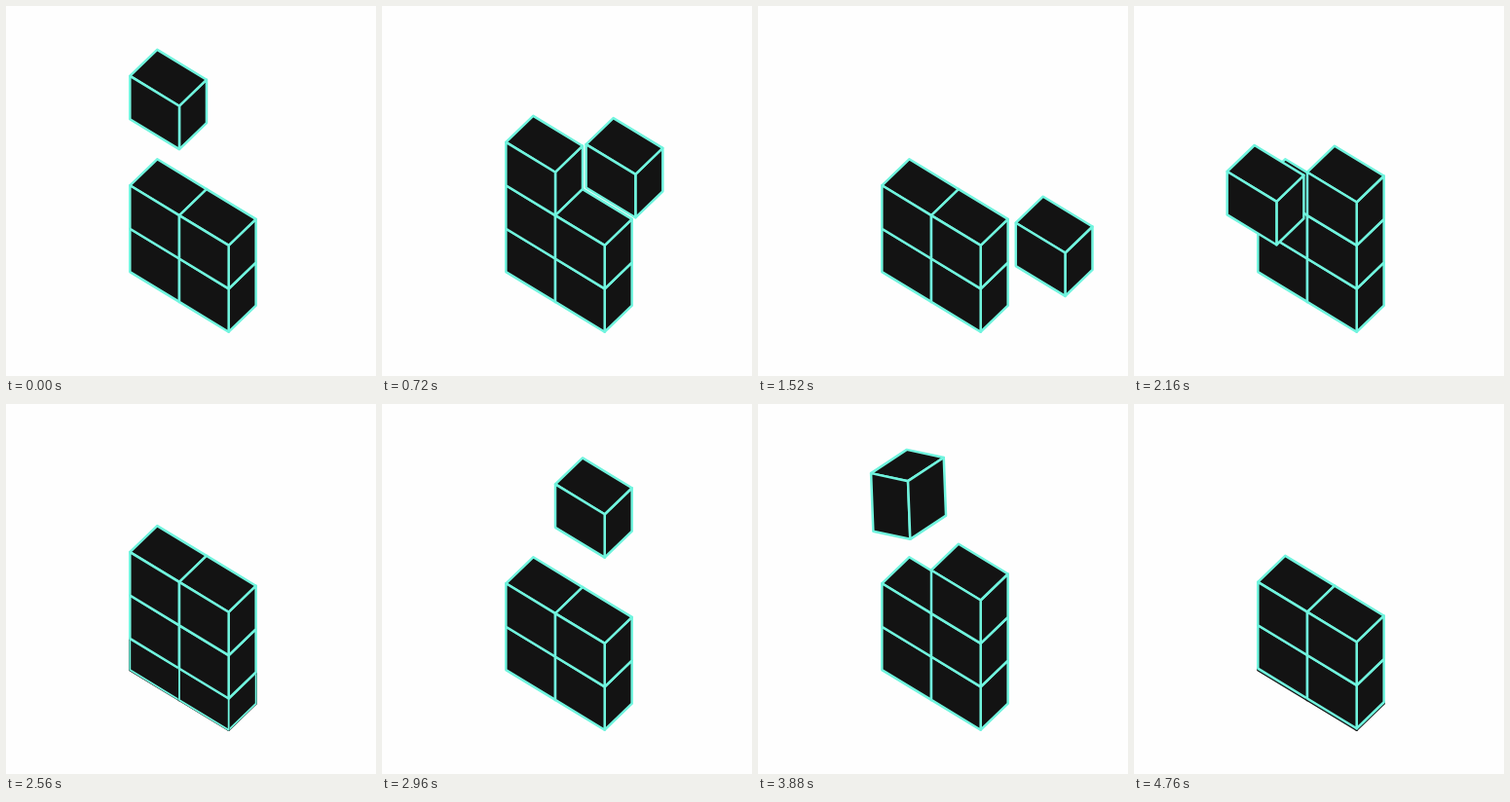
An HTML page with a canvas for the animation above (4.8 s loop, 380 by 380 pixels).

```html
<!DOCTYPE html>
<html lang="en">
<head>
<meta charset="utf-8">
<title>Stacking blocks</title>
<style>
  html, body { margin: 0; width: 100%; height: 100%; overflow: hidden; background: #fefefe; }
  canvas { display: block; width: 380px; height: 380px; }
</style>
</head>
<body>
<canvas id="stage"></canvas>
<script>
const LOOP = 4800, BEAT = 480;
const INK = '#131313', LINE = '#70f4de', WEIGHT = 2.5;
const ORIGIN = [127.3, 273.1];

// Orthographic view: screen x, screen y and depth of a point in the block's world.
const VIEW = [[0.78, 0, 0.622], [0.474, 0.643, -0.6], [-0.4, 0.766, 0.504]];
const SIZE = [65, 69.05, 45];

const canvas = document.getElementById('stage');
const ctx = canvas.getContext('2d');
const ratio = window.devicePixelRatio || 1;
canvas.width = canvas.height = 380 * ratio;
ctx.scale(ratio, ratio);
ctx.lineJoin = 'round';

// Each block slides from a screen offset into its column.
const blocks = [
  { col: 0, start: 0, end: 1440, from: [0, -68] },
  { col: 1, start: 480, end: 1440, from: [64, -58] },
  { col: 1, start: 1440, end: 2880, from: [88.5, 53] },
  { col: 0, start: 1920, end: 2880, from: [-64, 61] },
  { col: 1, start: 2880, end: 4800, from: [0, -90] },
  { col: 0, start: 3360, end: 4800, from: [-88.5, -53.8], tumble: true }
];
const sinks = [960, 2400, 4320];

const clamp = v => Math.min(1, Math.max(0, v));
const inOut = (t, power) => t < 0.5
  ? 0.5 * (2 * t) ** power
  : 1 - 0.5 * (2 - 2 * t) ** power;
const project = v => VIEW.map(row => row[0] * v[0] + row[1] * v[1] + row[2] * v[2]);

function spin(v, [ax, ay, az]) {
  const turn = (a, b, angle) => {
    const c = Math.cos(angle), s = Math.sin(angle);
    return [a * c - b * s, a * s + b * c];
  };
  let [x, y, z] = v;
  [x, y] = turn(x, y, az);
  [z, x] = turn(z, x, ay);
  [y, z] = turn(y, z, ax);
  return [x, y, z];
}

function drawBox(col, floor, { stretch = 1, shift = [0, 0], angles = [0, 0, 0] } = {}) {
  const size = [SIZE[0], SIZE[1] * stretch, SIZE[2]];
  const mid = project([SIZE[0] * (col + 0.5), -floor - size[1] / 2, SIZE[2] / 2]);
  const cx = ORIGIN[0] + mid[0] + shift[0];
  const cy = ORIGIN[1] + mid[1] + shift[1];
  const half = size.map((s, i) =>
    project(spin([0, 1, 2].map(k => k === i ? s / 2 : 0), angles)));

  for (let i = 0; i < 3; i++) {
    const near = half[i][2] < 0 ? 1 : -1;
    const n = half[i], p = half[(i + 1) % 3], q = half[(i + 2) % 3];
    ctx.beginPath();
    for (const [a, b] of [[-1, -1], [1, -1], [1, 1], [-1, 1]]) {
      ctx.lineTo(cx + near * n[0] + a * p[0] + b * q[0],
                 cy + near * n[1] + a * p[1] + b * q[1]);
    }
    ctx.closePath();
    ctx.fillStyle = INK;
    ctx.fill();
    if (stretch < 1) {
      ctx.strokeStyle = INK;
      ctx.lineWidth = WEIGHT;
      ctx.stroke();
    }
    ctx.strokeStyle = LINE;
    ctx.lineWidth = WEIGHT * stretch;
    ctx.stroke();
  }
}

function pose(block, time) {
  if (!block.tumble) {
    const left = 1 - inOut(clamp((time - block.start) / BEAT), 3);
    return { shift: block.from.map(v => v * left) };
  }
  const t = clamp((time - 3520) / 560);
  const left = 1 - inOut(t, 3.8);
  const arc = Math.sin(Math.PI * t);
  return {
    shift: [block.from[0] * left, block.from[1] * left - 71 * arc],
    angles: [Math.PI * (1 - t) ** 1.09, Math.PI * (1 - t) ** 0.89, 0.21 * arc]
  };
}

function draw(time) {
  ctx.fillStyle = '#fefefe';
  ctx.fillRect(0, 0, 380, 380);

  const sink = sinks.find(s => time >= s && time < s + BEAT);
  const stretch = sink === undefined ? 1 : 1 - inOut((time - sink) / BEAT, 1.5);
  const h = SIZE[1], base = h * stretch;

  for (const col of [0, 1]) {
    drawBox(col, 0, { stretch });
    drawBox(col, base);
    for (const block of blocks) {
      if (block.col === col && time >= block.start && time < block.end) {
        drawBox(col, base + h, pose(block, time));
      }
    }
  }
}

const began = performance.now();
function tick() {
  draw((performance.now() - began) % LOOP);
  requestAnimationFrame(tick);
}
tick();
</script>
</body>
</html>
```
